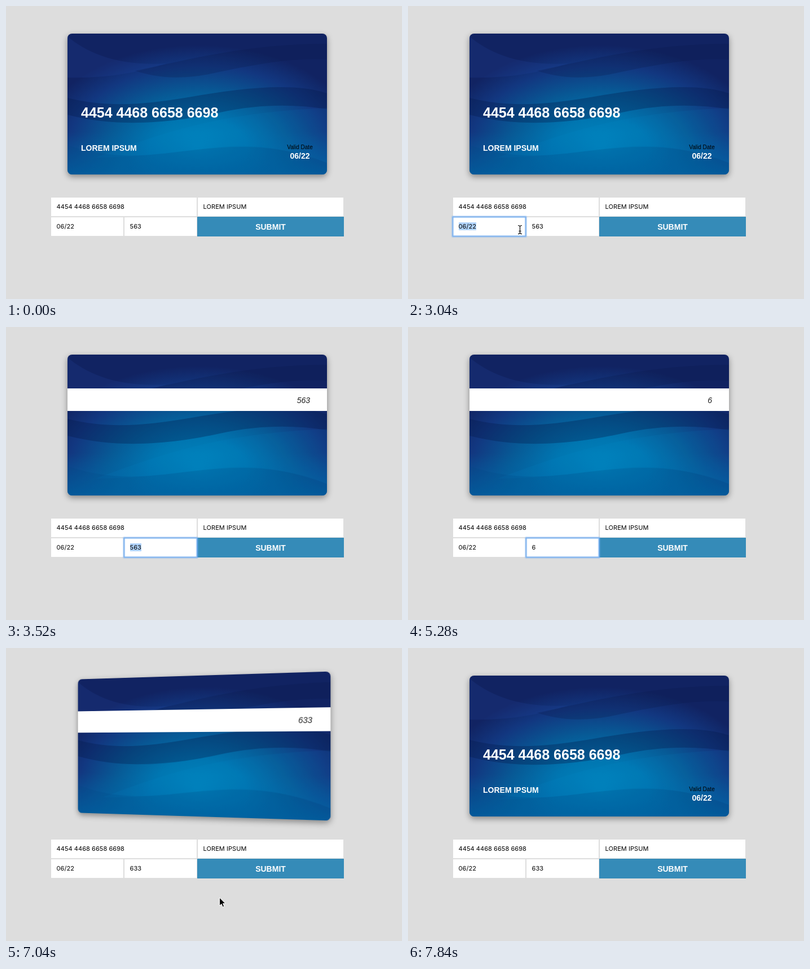
Recreate the animation shown at these times as an HTML page. Size 702x520 px, loop 8480 ms.

```html
<!DOCTYPE html>
<html lang="en">
<head>
<meta charset="utf-8">
<title>Card form</title>
<style>
  html, body { margin: 0; width: 100%; height: 100%; overflow: hidden; background: #ddd; }
  body { position: relative; font-family: "Liberation Sans", Arial, sans-serif; }
  .scene { position: absolute; left: 109px; top: 49px; width: 460px; height: 250px; perspective: 1000px; }
  .card { width: 100%; height: 100%; transform-style: preserve-3d; }
  .face { position: absolute; inset: 0; border-radius: 8px; overflow: hidden;
          backface-visibility: hidden; box-shadow: 0 4px 11px rgba(0, 0, 0, .4); }
  .back { transform: rotateY(180deg); }
  svg { display: block; }
  .bold { font-weight: bold; font-size: 14px; fill: #fff; }
  .field, .submit { position: absolute; box-sizing: border-box; height: 35px; }
  .field { background: #fff; border: 1px solid #ddd; padding-left: 9.6px;
           font: 11px/33px Inter, sans-serif; letter-spacing: .06px; color: #000; }
  .focus { z-index: 1; border-color: #7fb4f0;
           box-shadow: 0 0 2px 1.2px #6fabf2, inset 0 0 1.5px .5px #7fb4f0; }
  .selected span { background: #b0d3fb; }
  .submit { left: 339px; top: 374px; width: 260px; background: #358bb8; color: #fff;
            font-weight: bold; font-size: 14px; line-height: 36px; text-align: center; }
  .pointer { position: absolute; left: 0; top: 0; z-index: 2; overflow: visible; }
</style>
</head>
<body>
<svg width="0" height="0" style="position:absolute">
  <radialGradient id="glow" gradientUnits="userSpaceOnUse" cx="0" cy="0" r="1"
                  gradientTransform="translate(232 205) scale(290 185)">
    <stop offset="0" stop-color="#0087bf"/>
    <stop offset=".3" stop-color="#0076b1"/>
    <stop offset=".55" stop-color="#075a96"/>
    <stop offset=".8" stop-color="#123780"/>
    <stop offset="1" stop-color="#112362"/>
  </radialGradient>
  <linearGradient id="floor" x2="0" y2="1">
    <stop offset=".7" stop-color="#0069a8" stop-opacity="0"/>
    <stop offset="1" stop-color="#0069a8" stop-opacity=".8"/>
  </linearGradient>
  <symbol id="art" viewBox="0 0 460 250">
    <rect width="460" height="250" fill="url(#glow)"/>
    <rect width="460" height="250" fill="url(#floor)"/>
    <path d="M0 5C35 35 90 58 175 53C130 68 70 80 0 78Z" fill="#2346a0" opacity=".2"/>
    <path d="M120 66C220 45 320 18 460 18V46C400 42 330 55 260 70S150 75 120 66Z" fill="#0a1848" opacity=".25"/>
    <path d="M0 114C70 132 140 126 220 112S400 85 460 106V134C400 125 340 125 270 140S100 170 0 144Z" fill="#061a4a" opacity=".33"/>
    <path d="M50 220C160 180 260 140 460 132V230C380 200 320 195 250 203S120 220 50 220Z" fill="#00a0e0" opacity=".07"/>
    <path d="M0 198C60 218 110 220 180 212S350 185 460 229V250H0Z" fill="#00457f" opacity=".18"/>
  </symbol>
</svg>

<div class="scene"><div class="card" id="card">
  <div class="face"><svg width="460" height="250">
    <use href="#art" width="460" height="250"/>
    <text class="bold" x="24" y="149" style="font-size:25px">4454 4468 6658 6698</text>
    <text class="bold" x="24" y="208">LOREM IPSUM</text>
    <text x="412" y="205" font-size="10" text-anchor="middle">Valid Date</text>
    <text class="bold" x="412" y="222" text-anchor="middle">06/22</text>
  </svg></div>
  <div class="face back"><svg width="460" height="250">
    <use href="#art" width="460" height="250"/>
    <rect y="60" width="460" height="40" fill="#fff"/>
    <text id="code" x="430" y="86" font-size="14" font-style="italic" text-anchor="end" fill="#222"></text>
  </svg></div>
</div></div>

<div class="field" style="left:79px;top:339px;width:260px"><span>4454 4468 6658 6698</span></div>
<div class="field" style="left:339px;top:339px;width:260px"><span>LOREM IPSUM</span></div>
<div class="field" style="left:79px;top:374px;width:130px"><span>06/22</span></div>
<div class="field" style="left:209px;top:374px;width:130px"><span></span></div>
<div class="submit">SUBMIT</div>

<svg class="pointer" id="pointer" width="1" height="1">
  <path id="arrow" d="M0 0V14.5L3.4 11.4L5.7 16.6L8.2 15.5L6 10.4H10.4Z" fill="#000" stroke="#fff"/>
  <g id="beam" fill="none">
    <path id="bar" d="M-3.5 -7.5Q0 -7.5 0 -5V5Q0 7.5 -3.5 7.5M3.5 -7.5Q0 -7.5 0 -5M0 5Q0 7.5 3.5 7.5M-2 2.5H2" stroke="#fff" stroke-width="2.4"/>
    <use href="#bar" style="stroke:#000"/>
    <path d="M-3.5 -7.5Q0 -7.5 0 -5V5Q0 7.5 -3.5 7.5M3.5 -7.5Q0 -7.5 0 -5M0 5Q0 7.5 3.5 7.5M-2 2.5H2" stroke="#000" stroke-width="1.2"/>
  </g>
</svg>

<script>
const LOOP = 8480, STEP = 160;
const el = id => document.getElementById(id);
const fields = [...document.querySelectorAll('.field')];

// Tracks are [time, ...values], interpolated linearly.
const turn = [[3200, 0], [3360, 143], [3520, 180], [6880, 180],
              [7040, 166], [7200, 40.4], [7360, 4], [7520, 0]];
const path = [[480, 464, 450], [640, 360, 412], [800, 256, 362], [1280, 256, 362], [1440, 252, 356],
              [2720, 252, 356], [3040, 198, 397], [6080, 198, 397], [6400, 312, 416],
              [6560, 360, 429], [6720, 372, 438], [6880, 378, 443], [7200, 378, 443], [7680, 412, 487]];
const shown = [[480, 2240], [2880, 3360], [6080, 7840]];

// Steps are [time, value], each held until the next.
const focusSteps = [[0, -1], [1760, 0], [2240, 1], [2720, 2], [3360, 3], [7040, -1]];
const codeSteps = [[0, '563'], [5280, '6'], [5440, '63'], [5920, '633']];

const held = (steps, t) => steps.filter(s => s[0] <= t).pop()[1];

function sample(track, t) {
  const i = track.findIndex(p => p[0] > t);
  if (i < 1) return track.at(i).slice(1);
  const a = track[i - 1], b = track[i], k = (t - a[0]) / (b[0] - a[0]);
  return a.slice(1).map((v, j) => v + (b[j + 1] - v) * k);
}

function draw(t) {
  el('card').style.transform = `rotateY(${sample(turn, t)[0]}deg)`;

  const code = held(codeSteps, t), focus = held(focusSteps, t);
  el('code').textContent = fields[3].firstChild.textContent = code;
  fields.forEach((field, i) => {
    field.classList.toggle('focus', i === focus);
    field.classList.toggle('selected', i === focus && i > 0 && t < 5280);
  });

  const [x, y] = sample(path, t);
  const overField = x > 80 && x < 338 && y > 340 && y < 408;
  el('pointer').style.display = shown.some(([a, b]) => t >= a && t < b) ? 'block' : 'none';
  el('pointer').style.transform = `translate(${x + .5}px, ${y}px)`;
  el('arrow').style.display = overField ? 'none' : 'inline';
  el('beam').style.display = overField ? 'inline' : 'none';
}

const start = performance.now();
function tick() {
  const t = (performance.now() - start) % LOOP;
  draw(Math.floor(t / STEP) * STEP);
  requestAnimationFrame(tick);
}
tick();
</script>
</body>
</html>
```
